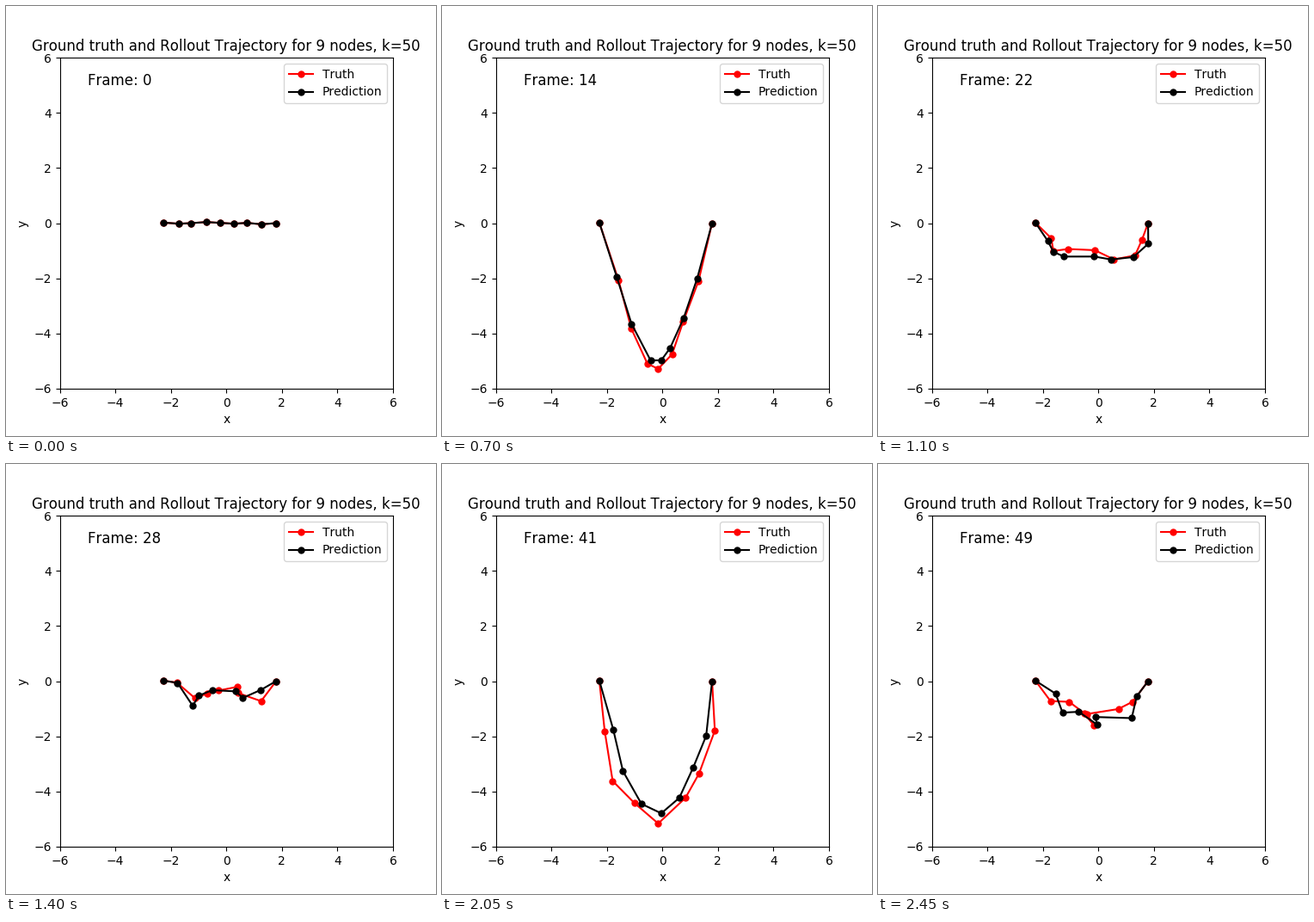
These frames come from a looping animation (500x500 px, 2500 ms). A matplotlib script:

```python
import numpy as np
import matplotlib.pyplot as plt
from matplotlib.animation import FuncAnimation

plt.rcParams['text.kerning_factor'] = 6

FRAMES, STEP = 50, 0.1            # frames per loop, seconds of physics per frame
K, REST, G = 50.0, 0.5, 9.8       # spring stiffness, rest length, gravity
KEYS = [8, 14, 22, 34, 41, 49]
PINNED = [2, 4, 6]

START = np.array([(-2.27, .02), (-1.71, -.02), (-1.28, 0), (-.72, .04),
                  (-.22, .01), (.27, -.02), (.74, .01), (1.26, -.04), (1.79, 0)])

# Where the three pinned nodes pass at the key times; the springs do the rest
TRUTH = [
    [(-1.81, -2.48), (-.19, -3.31), (1.36, -2.46)],
    [(-1.12, -3.82), (-.15, -5.28), (.75, -3.57)],
    [(-1.62, -1.01), (-.13, -.98), (1.32, -1.17)],
    [(-.98, -1.85), (-.19, -3.27), (.46, -1.82)],
    [(-1.79, -3.62), (-.15, -5.16), (1.32, -3.35)],
    [(-1.05, -.75), (-.15, -1.62), (.72, -1.01)],
]
PREDICTION = [
    [(-1.83, -2.36), (-.19, -3.13), (1.36, -2.39)],
    [(-1.11, -3.65), (-.04, -4.97), (.77, -3.43)],
    [(-1.62, -1.04), (-.15, -1.21), (1.26, -1.23)],
    [(-1.37, -1.92), (-.33, -3.07), (.44, -1.75)],
    [(-1.42, -3.26), (-.04, -4.79), (1.11, -3.13)],
    [(-1.29, -1.14), (-.05, -1.57), (1.20, -1.34)],
]

LINKS = np.eye(8, 7) - np.eye(8, 7, k=-1)


def time_operators():
    """Second difference and force average over time, starting at rest."""
    one, up, down = np.eye(FRAMES), np.eye(FRAMES, k=1), np.eye(FRAMES, k=-1)
    diff = (up - 2 * one + down) / STEP ** 2
    mean = (up + 10 * one + down) / 12
    for op in (diff, mean):
        op[0, 1] *= 2
        op[0] *= 0.3
    return diff[:-1], mean[:-1]


def free_coordinates():
    """Flags for the x and y of each inner node that the springs decide."""
    free = np.ones((FRAMES, 9), bool)
    free[0] = False
    free[np.ix_(KEYS, PINNED)] = False
    return np.repeat(free[:, 1:-1].ravel(), 2)


DIFF, MEAN = time_operators()
FREE = free_coordinates()


def spring_terms(path):
    d = np.diff(path, axis=1)
    length = np.maximum(np.linalg.norm(d, axis=2), 0.15)[..., None]
    return d, length, 1 - REST / length


def residual(path):
    """How far the path is from the motion of a hanging spring chain."""
    d, _, pull = spring_terms(path)
    acc = np.diff(K * pull * d, axis=1)
    acc[..., 1] -= G
    flat = path[:, 1:-1].reshape(FRAMES, 14)
    return (DIFF @ flat - MEAN @ acc.reshape(FRAMES, 14)).ravel()


def jacobian(path):
    d, length, pull = spring_terms(path)
    outer = d[..., :, None] * d[..., None, :]
    stiff = K * (pull[..., None] * np.eye(2) + REST * outer / length[..., None] ** 3)
    block = -np.einsum('ji,tjab,jk->tiakb', LINKS, stiff, LINKS)
    block = block.reshape(FRAMES, 14, 14)
    jac = (np.einsum('nt,ab->natb', DIFF, np.eye(14))
           - np.einsum('nt,tab->natb', MEAN, block))
    return jac.reshape(-1, FRAMES * 14)[:, FREE]


def pose(pins):
    """Straight links through the two ends and the pinned nodes."""
    points = np.vstack([START[:1], pins, START[-1:]])
    knots = [0, *PINNED, 8]
    return np.column_stack([np.interp(range(9), knots, c) for c in points.T])


def first_guess(pins):
    """Straight runs between poses, thrown as a parabola from the high ones."""
    times, poses = [0, *KEYS], [START, *map(pose, pins)]
    path = np.empty((FRAMES, 9, 2))
    for a, b, p, q in zip(times, times[1:], poses, poses[1:]):
        t = np.arange(b - a + 1)[:, None, None]
        path[a:b + 1] = p + (q - p) * t / (b - a)
        if p[1:-1, 1].mean() > -1.4:
            path[a:b + 1, 1:-1, 1] += G / 2 * STEP ** 2 * (t * (b - a - t))[..., 0]
    return path


def solve_path(pins):
    """Most physical path through the pins, by damped least squares."""
    path = first_guess(pins)
    res, damp = residual(path), 100.0
    for _ in range(50):
        jac = jacobian(path)
        normal = jac.T @ jac + damp * np.eye(jac.shape[1])
        step = np.zeros(FRAMES * 14)
        step[FREE] = np.linalg.solve(normal, jac.T @ res)
        trial = path.copy()
        trial[:, 1:-1] -= step.reshape(FRAMES, 7, 2)
        new = residual(trial)
        if new @ new < res @ res:
            gain = 1 - (new @ new) / (res @ res)
            path, res, damp = trial, new, max(damp * 0.25, 0.1)
            if gain < 1e-4:
                break
        else:
            damp *= 5
    return path


truth, prediction = solve_path(TRUTH), solve_path(PREDICTION)

fig, ax = plt.subplots(figsize=(5, 5), dpi=100)
ax.set(xlim=(-6, 6), ylim=(-6, 6), xlabel='x', ylabel='y')
ax.set_xticks(range(-6, 7, 2))
ax.set_yticks(range(-6, 7, 2))
ax.set_title('Ground truth and Rollout Trajectory for 9 nodes, k=50')
truth_line, = ax.plot([], [], 'o-', color='red', ms=5, label='Truth')
prediction_line, = ax.plot([], [], 'o-', color='black', ms=5, label='Prediction')
counter = ax.text(-5, 5, '', fontsize=12)
ax.legend(loc='upper right')


def draw(i):
    truth_line.set_data(*truth[i].T)
    prediction_line.set_data(*prediction[i].T)
    counter.set_text(f'Frame: {i}')
    return truth_line, prediction_line, counter


anim = FuncAnimation(fig, draw, frames=FRAMES, interval=50, repeat=True)
plt.show()
```
